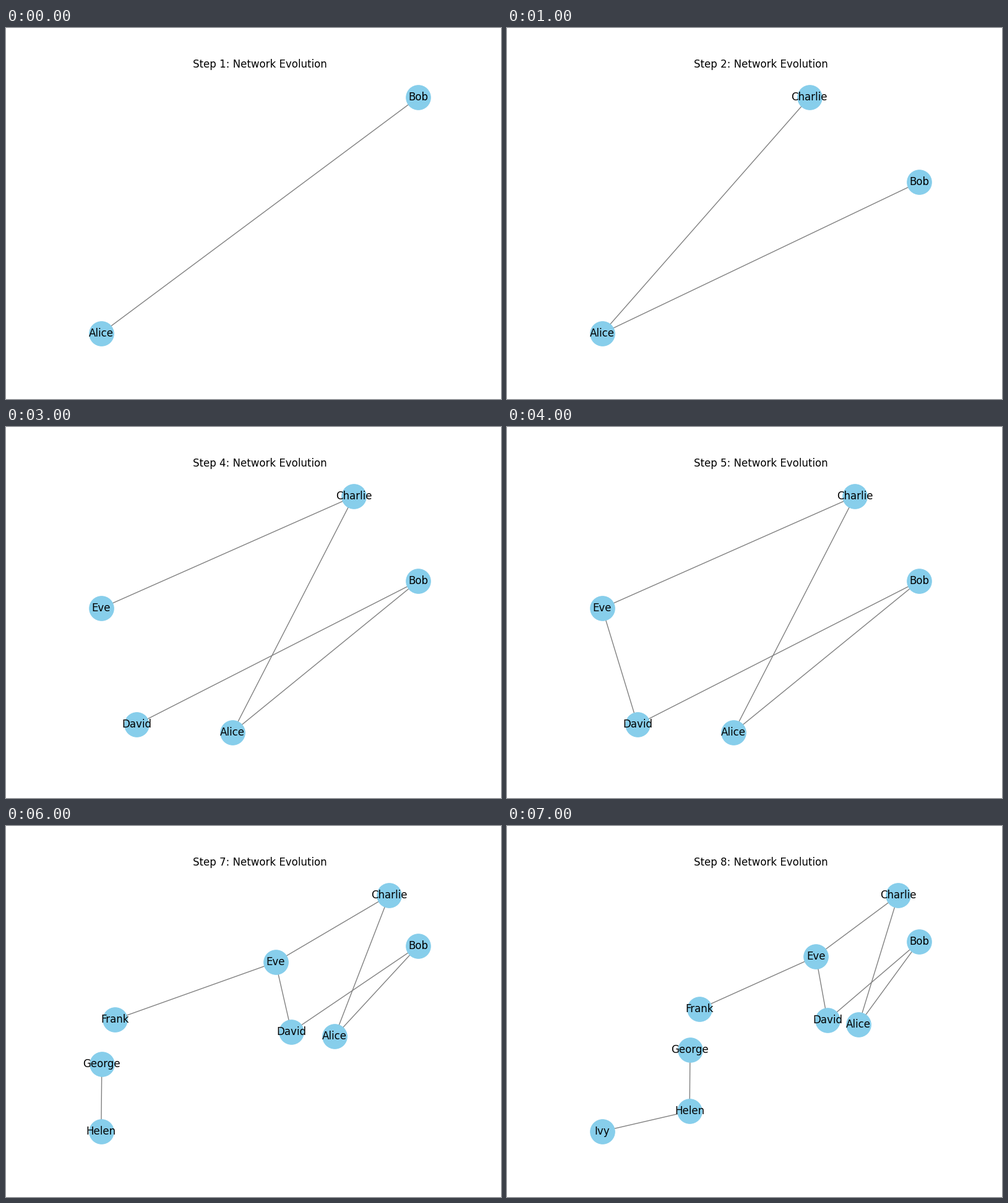
A matplotlib script for the animation above (8000 ms loop, 800 by 600 pixels).

```python
import matplotlib.pyplot as plt
from matplotlib.animation import FuncAnimation
from matplotlib.collections import LineCollection

# Node positions: x measured leftwards from Bob, y downwards from Charlie.
OFFSETS = {
    "Alice": (0.6597, 1.0),
    "Bob": (0.0, 0.3588),
    "Charlie": (0.2284, 0.0),
    "David": (1.0, 0.9665),
    "Eve": (1.126, 0.474),
    "Frank": (2.394, 0.880),
    "George": (2.497, 1.1955),
    "Helen": (2.502, 1.672),
    "Ivy": (3.455, 1.8285),
}
POS = {name: (-dx, -dy) for name, (dx, dy) in OFFSETS.items()}

# One edge joins the network at each step.
EDGES = [
    ("Alice", "Bob"),
    ("Alice", "Charlie"),
    ("Bob", "David"),
    ("Charlie", "Eve"),
    ("David", "Eve"),
    ("Eve", "Frank"),
    ("George", "Helen"),
    ("Helen", "Ivy"),
]
PAD = 0.105

fig, ax = plt.subplots(figsize=(8, 6), dpi=100)


def padded(values):
    lo, hi = min(values), max(values)
    pad = PAD * (hi - lo)
    return lo - pad, hi + pad


def draw_step(step):
    ax.clear()
    ax.set_axis_off()
    edges = EDGES[:step + 1]
    names = sorted({name for edge in edges for name in edge})
    xs, ys = zip(*(POS[name] for name in names))

    ax.add_collection(LineCollection(
        [(POS[a], POS[b]) for a, b in edges],
        colors="gray", linewidths=1, zorder=1))
    ax.scatter(xs, ys, s=800, c="skyblue", linewidths=1, zorder=2)
    for name, x, y in zip(names, xs, ys):
        ax.text(x, y, name, fontsize=12, ha="center", va="center", zorder=3)

    ax.set_xlim(padded(xs))
    ax.set_ylim(padded(ys))
    ax.set_title(f"Step {step + 1}: Network Evolution", fontsize=12)


anim = FuncAnimation(fig, draw_step, frames=len(EDGES), interval=1000,
                     init_func=lambda: None, repeat=True, repeat_delay=0)
plt.show()
```
